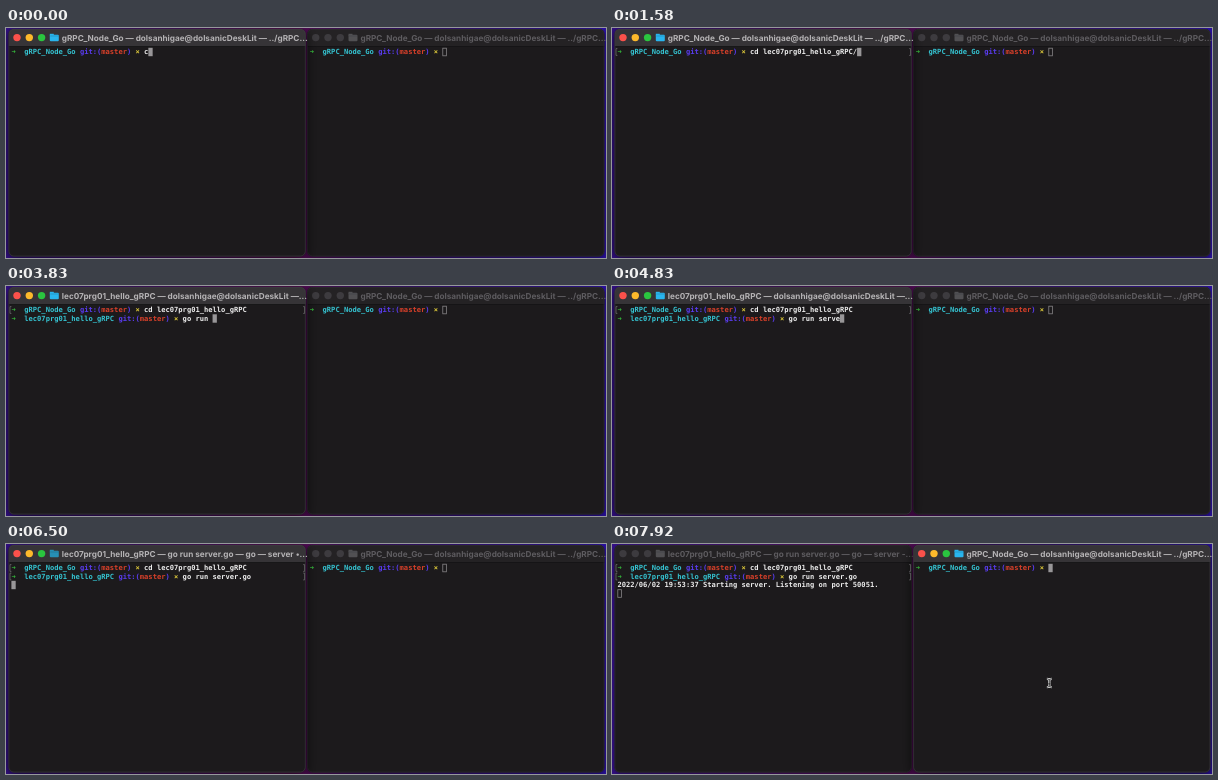
These frames come from a looping animation (600x230 px, 8000 ms). An HTML page with a canvas:

```html
<!DOCTYPE html>
<html lang="en">
<head>
<meta charset="utf-8">
<title>Two terminals</title>
<style>
html, body { margin: 0; width: 100%; height: 100%; overflow: hidden; background: #150822; }
canvas { display: block; width: 600px; height: 230px; }
</style>
</head>
<body>
<canvas id="stage"></canvas>
<script>
const W = 600, H = 230, LOOP = 8000;
const CELL = 4.28, ROW = 8.5, FIRST_ROW = 24;
const MONO = 'bold 7.1px "DejaVu Sans Mono", monospace';
const SANS = 'bold 8.2px Inter, sans-serif';
const INK = { arrow: '#35b83b', dir: '#35c3d1', git: '#5a3cf0', branch: '#d9402a', dirty: '#dcc83a', text: '#ececec' };

const HOST = 'dolsanhigae@dolsanicDeskLit';
const LESSON = 'lec07prg01_hello_gRPC';
const HOME_TITLE = `gRPC_Node_Go — ${HOST} — ../gRPC...`;
const TITLES = [
  [0, HOME_TITLE],
  [2000, `${LESSON} — ${HOST} —...`],
  [6420, `${LESSON} — go run server.go — go — server •...`],
  [7540, `${LESSON} — go run server.go — go — server -...`]
];
const CD_KEYS = [
  [0, 'c'], [170, 'cd'], [330, 'cd '], [580, 'cd l'], [750, 'cd le'], [920, 'cd lec'],
  [1170, 'cd lec0'], [1330, 'cd lec07'], [1500, `cd ${LESSON}/`], [1920, `cd ${LESSON}`]
];
const RUN_KEYS = [
  [0, ''], [2830, 'g'], [3000, 'go'], [3170, 'go '], [3330, 'go r'], [3420, 'go ru'], [3580, 'go run'],
  [3750, 'go run '], [4170, 'go run s'], [4330, 'go run se'], [4500, 'go run ser'], [4670, 'go run serv'],
  [4830, 'go run serve'], [5000, 'go run server'], [5250, 'go run server.'], [5420, 'go run server.g'],
  [5580, 'go run server.go']
];
const MARK1 = 1500, NEW_PROMPT = 2000, START = 6250, LISTENING = 7500, SWITCH = 7580;
const POINTER_IN = 6830, POINTER_REST = 7170;

const canvas = document.getElementById('stage');
const ctx = canvas.getContext('2d');
const dpr = window.devicePixelRatio || 1;
canvas.width = W * dpr;
canvas.height = H * dpr;

const at = (steps, t) => steps.filter(([start]) => start <= t).pop()[1];

function rect(x, y, w, h, color) {
  ctx.fillStyle = color;
  ctx.fillRect(x, y, w, h);
}

function label(text, x, y, color, font) {
  ctx.font = font;
  ctx.fillStyle = color;
  ctx.fillText(text, x, y);
}

function desktop() {
  const g = ctx.createLinearGradient(0, 0, W, 0);
  g.addColorStop(0, '#35108a');
  g.addColorStop(0.47, '#5c0c55');
  g.addColorStop(0.6, '#380c62');
  g.addColorStop(1, '#2a10a0');
  rect(0, 0, W, H, g);
}

function folder(x, active, busy) {
  const color = !active ? '#515053' : busy ? '#278fb5' : '#29b5ee';
  rect(x, 5.8, 4, 2, color);
  ctx.fillStyle = color;
  ctx.beginPath();
  ctx.roundRect(x, 6.7, 9, 6.6, 1);
  ctx.fill();
  rect(x + 0.4, 7.7, 8.2, 0.6, 'rgba(20,30,40,.3)');
}

function windowFrame(x, active, title, busy) {
  ctx.save();
  ctx.beginPath();
  ctx.roundRect(x, 1, 297, 227.4, 5);
  ctx.fillStyle = '#1c1a1c';
  ctx.shadowColor = active ? 'rgba(0,0,0,.8)' : 'rgba(0,0,0,.5)';
  ctx.shadowBlur = (active ? 12 : 6) * dpr;
  ctx.shadowOffsetY = 2 * dpr;
  ctx.fill();
  ctx.shadowColor = 'transparent';
  ctx.clip();
  rect(x, 0, 298, 18.5, active ? '#363437' : '#242224');
  rect(x, 18.3, 298, 0.7, '#111012');
  ctx.restore();

  ctx.strokeStyle = active ? '#413e43' : '#322f35';
  ctx.lineWidth = 0.6;
  ctx.beginPath();
  ctx.roundRect(x + 0.3, 1.3, 296.4, 226.8, 5);
  ctx.stroke();

  ['#fb514b', '#fdb92b', '#2ac53f'].forEach((color, i) => {
    ctx.fillStyle = active ? color : '#3d3b3f';
    ctx.beginPath();
    ctx.arc(x + 8.4 + i * 12.3, 9.6, 3.7, 0, Math.PI * 2);
    ctx.fill();
  });
  folder(x + 41.2, active, busy);
  label(title, x + 53.2, 12.7, active ? '#b5b3b5' : '#5e5c60', SANS);
}

function cells(text, x, col, row, color) {
  ctx.font = MONO;
  ctx.fillStyle = color;
  [...text].forEach((ch, i) => ctx.fillText(ch, x + (col + i) * CELL, FIRST_ROW + row * ROW + 2.3));
  return col + text.length;
}

// Draws one shell prompt and returns the column after the command.
function prompt(x, row, dir, command) {
  cells('➜', x, 0, row, INK.arrow);
  let col = cells(dir, x, 3, row, INK.dir) + 1;
  col = cells('git:(', x, col, row, INK.git);
  col = cells('master', x, col, row, INK.branch);
  col = cells(')', x, col, row, INK.git) + 1;
  col = cells('×', x, col, row, INK.dirty) + 1;
  return cells(command, x, col, row, INK.text);
}

function caret(x, col, row, active) {
  const left = x + col * CELL, top = FIRST_ROW + row * ROW - 4.2;
  if (active) return rect(left, top, 4.3, 8.4, '#989698');
  ctx.strokeStyle = '#858385';
  ctx.lineWidth = 0.8;
  ctx.strokeRect(left + 0.4, top + 0.4, 3.6, 7.6);
}

function marks(row) {
  const y = FIRST_ROW + row * ROW;
  ctx.strokeStyle = '#767477';
  ctx.lineWidth = 0.7;
  ctx.beginPath();
  for (const [edge, inner] of [[4, 5.4], [298.6, 297.2]]) {
    ctx.moveTo(inner, y - 3.4);
    ctx.lineTo(edge, y - 3.4);
    ctx.lineTo(edge, y + 3.4);
    ctx.lineTo(inner, y + 3.4);
  }
  ctx.stroke();
}

function leftShell(t) {
  const x = 5.4, active = t < SWITCH;
  let row = 0;
  let col = prompt(x, 0, 'gRPC_Node_Go', at(CD_KEYS, t));
  if (t >= MARK1) marks(0);
  if (t >= NEW_PROMPT) {
    row = 1;
    col = prompt(x, 1, LESSON, at(RUN_KEYS, t));
  }
  if (t >= START) {
    marks(1);
    row = 2;
    col = 0;
  }
  if (t >= LISTENING) {
    cells('2022/06/02 19:53:37 Starting server. Listening on port 50051.', x, 0, 2, INK.text);
    row = 3;
  }
  caret(x, col, row, active);
}

function arrowPointer(x, y) {
  const shape = new Path2D('M0 0V9.2L2.1 7.3L3.6 10.6L5.2 9.9L3.8 6.7H6.6Z');
  ctx.save();
  ctx.translate(x, y);
  ctx.fillStyle = '#080808';
  ctx.fill(shape);
  ctx.strokeStyle = '#f2f2f2';
  ctx.lineWidth = 0.9;
  ctx.stroke(shape);
  ctx.restore();
}

function textPointer(x, y) {
  const shape = new Path2D('M-2.4 -4.2Q-.3 -4.2 0 -3Q.3 -4.2 2.4 -4.2M0 -3V3M-2.4 4.2Q-.3 4.2 0 3Q.3 4.2 2.4 4.2M-1.2 .9H1.2');
  ctx.save();
  ctx.translate(x, y);
  for (const [color, width] of [['#f0f0f0', 2.2], ['#151515', 0.8]]) {
    ctx.strokeStyle = color;
    ctx.lineWidth = width;
    ctx.stroke(shape);
  }
  ctx.restore();
}

function pointer(t) {
  if (t < POINTER_IN) return;
  if (t >= SWITCH) return textPointer(437.3, 139);
  const p = Math.min(1, (t - POINTER_IN) / (POINTER_REST - POINTER_IN));
  const left = (1 - p) ** 3;
  arrowPointer(437 - 105 * left, 137.8 + 14 * left);
}

function draw(t) {
  const leftActive = t < SWITCH;
  const frames = [
    () => windowFrame(2.6, leftActive, at(TITLES, t), t >= START),
    () => windowFrame(301.3, !leftActive, HOME_TITLE, false)
  ];
  // The active window goes on top, so its shadow falls on the other one.
  if (leftActive) frames.reverse();

  ctx.setTransform(dpr, 0, 0, dpr, 0, 0);
  ctx.textRendering = 'geometricPrecision';
  desktop();
  frames.forEach(frame => frame());
  leftShell(t);
  caret(303.7, prompt(303.7, 0, 'gRPC_Node_Go', ''), 0, !leftActive);
  pointer(t);
}

const begin = performance.now();
function tick() {
  draw((performance.now() - begin) % LOOP);
  requestAnimationFrame(tick);
}
tick();
</script>
</body>
</html>
```
